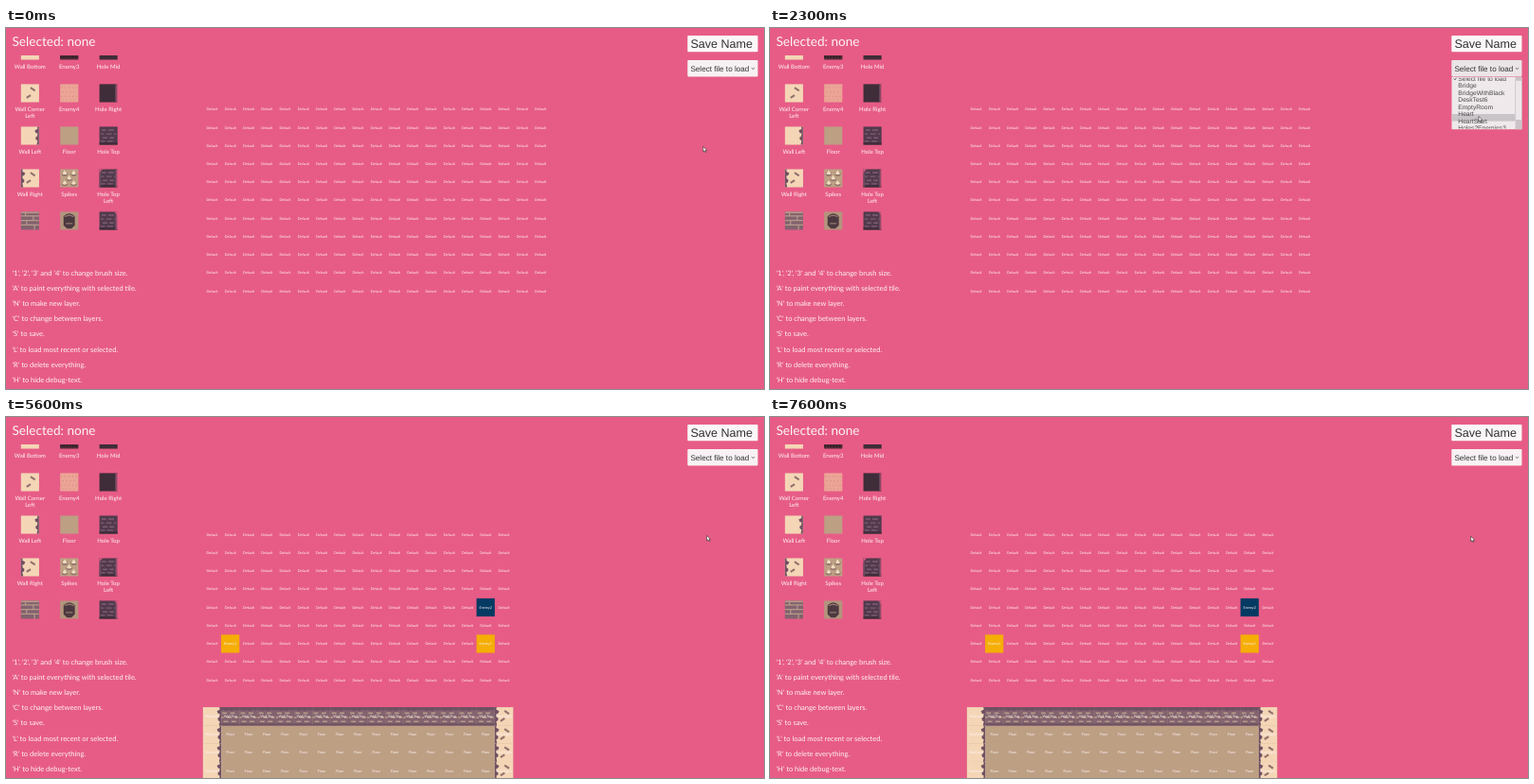
Recreate the animation shown at these times as an HTML page. Size 800 by 382 pixels, loop 8 s.

```html
<!DOCTYPE html>
<html lang="en">
<head>
<meta charset="utf-8">
<title>Tile map editor</title>
<style>
  html, body { margin: 0; width: 100%; height: 100%; overflow: hidden; background: #e75c86; }
  svg { display: block; width: 100vw; height: 100vh; }
  text { text-rendering: geometricPrecision; }
  .ui { font-family: Lato, "Open Sans", sans-serif; fill: #fff4f7; }
  .box { font-family: "Liberation Sans", Arial, sans-serif; fill: #323232; }
  .mid { text-anchor: middle; }
</style>
</head>
<body>
<svg id="stage" viewBox="0 0 800 382"></svg>
<script>
const LOOP = 8000, STEP = 100;
const CELL = 19.25, ROW = 19.22, LEFT = 207.9, LAYER_GAP = 192.2;
const C = {
  bg: '#e75c86', cream: '#f4d6b6', tan: '#bd9f84', chip: '#93716d', plum: '#6f5063',
  hole: '#3f2d39', rim: '#694a60', brick: '#82636e', mortar: '#b8998a', blue: '#053a63', gold: '#f5ae05'
};

const rect = (x, y, w, h, fill, extra = '') =>
  `<rect x="${x}" y="${y}" width="${w}" height="${h}" fill="${fill}" ${extra}/>`;
const path = (d, fill, extra = '') => `<path d="${d}" fill="${fill}" ${extra}/>`;
const line = (d, color, width, dash = 'none') =>
  path(d, 'none', `stroke="${color}" stroke-width="${width}" stroke-dasharray="${dash}"`);
const text = (x, y, size, str, cls = 'ui', extra = '') =>
  `<text x="${x}" y="${y}" font-size="${size}" class="${cls}" ${extra}>${str}</text>`;
const label = (x, y, str) => text(x, y + 1.3, 3.75, str, 'ui mid');
const range = (n, fn) => Array.from({ length: n }, (_, i) => fn(i)).join('');
const mirror = art => `<g transform="matrix(-1 0 0 1 16 0)">${art}</g>`;

// Tiles live on a 16 x 16 grid.
const base = fill => rect(0, 0, 16.1, 16.1, fill);
const edge = path('M16 0h-1.6l.4 2-2.6 1.5 1 2 1.6.5-.4 2.5-1.4 1 .2 2 1.6 1-.8 3.5h2z', C.plum);
const chips = line('M8.5 3.2l4 2.6M5 12.2l3.6-2.4', C.chip, 1.8);
const holeBricks = line('M2 3h4M8 3h5M1 6.5h3M6 6.5h5M13 6.5h2M3 10h4M9 10h4M1 13h4M7 13h5', '#7d5c74', 1.2);
const holeTop = base('#523a4c') + rect(0, 14.2, 16, 1.9, C.hole) + holeBricks;
const rim = rect(13.9, 0, 1.3, 16, C.rim) + rect(15.2, 0, .9, 16.1, C.bg);
const corner = path('M0 0h5q-5 0-5 5z', C.bg);

const tiles = {
  floor: base(C.tan),
  wallLeft: base(C.cream) + edge,
  wallRight: base(C.cream) + mirror(edge) + chips,
  chipped: base(C.cream) + chips,
  wallBottom: base(C.cream) +
    path('M0 0h16v1.6l-2 .2-1.5 1.4-2-1.4-2 .2-1.5 1.4-2-1.6-2 1.2-1.5-1.2-1.5 .4z', C.plum),
  wallTop: base(C.brick) +
    line('M1 5.2h4M8 5.2h4M0 9h2M5 9h4M12 9h3M2 12.6h4M9 12.6h4', C.mortar, 1.4) +
    path('M0 0h16v2l-2 1-2-1-3 1.6-2-1.2-3 1-2-1.2-2 .8z', C.plum) + rect(0, 14.4, 16, 1.7, C.plum),
  bricks: base(C.brick) +
    line('M0 3.8h16M0 7.8h16M0 11.8h16M4 0v4M11 4v4M5 8v4M12 12v4', C.mortar, 1) + rect(0, 0, 16, 1.4, C.mortar),
  enemy3: base('#4f2c38') + line('M0 13.8h16', '#2b1c25', 1.6, '1.4 1.2'),
  enemy4: base('#eba596') + line('M1 3h14M2 7h13M1 11h14M2 14h13', '#dd8a86', 1, '1 2.2'),
  holeMid: base(C.hole),
  holeRight: base(C.hole) + rim,
  holeTop,
  holeTopLeft: holeTop + rim + rect(0, 0, 1.4, 16, C.rim) + corner,
  holeTopRight: holeTop + rim + mirror(corner),
  spikes: base(C.tan) + [[4, 3], [12, 3], [8, 7.5], [4, 12], [12, 12]].map(([x, y]) =>
    `<ellipse cx="${x}" cy="${y + 1.4}" rx="2.6" ry="1.7" fill="#92746b"/>` +
    path(`M${x - 2.2} ${y + 1}l2.2-3 2.2 3q-2.2 1.6-4.4 0z`, '#eedcc0')).join(''),
  crest: base('#b3957d') + path('M3 4q5-5 10 0v8l-3 3h-4l-3-3z', '#4b3840') +
    line('M4 4.5q4-2.5 8 0M5 10.5h6', '#94786e', 1.2)
};
const defs = Object.entries(tiles).map(([id, art]) => `<g id="${id}">${art}</g>`).join('');
const tile = (id, x, y, size = CELL) =>
  `<use href="#${id}" transform="translate(${x} ${y}) scale(${size / 16})"/>`;

const colX = c => LEFT + CELL * (c + .5);

function palette() {
  const rows = [
    [['wallBottom', 'Wall Bottom'], ['enemy3', 'Enemy3'], ['holeMid', 'Hole Mid']],
    [['chipped', 'Wall Corner|Left'], ['enemy4', 'Enemy4'], ['holeRight', 'Hole Right']],
    [['wallLeft', 'Wall Left'], ['floor', 'Floor'], ['holeTop', 'Hole Top']],
    [['wallRight', 'Wall Right'], ['spikes', 'Spikes'], ['holeTopLeft', 'Hole Top|Left']],
    [['bricks', ''], ['crest', ''], ['holeTopRight', '']]
  ];
  const items = rows.map((row, r) => row.map(([id, name], c) => {
    const x = 25.3 + c * 41.4, y = 14.4 + r * 45;
    return tile(id, x - 9.5, y, 19) +
      name.split('|').map((s, i) => text(x, y + 28.7 + i * 7.1, 6.05, s, 'ui mid')).join('');
  }).join('')).join('');
  return `<clipPath id="view"><rect x="0" y="29" width="140" height="185"/></clipPath>
    <g clip-path="url(#view)">${items}</g>`;
}

function help() {
  return ["'1', '2', '3' and '4' to change brush size.", "'A' to paint everything with selected tile.",
    "'N' to make new layer.", "'C' to change between layers.", "'S' to save.",
    "'L' to load most recent or selected.", "'R' to delete everything.", "'H' to hide debug-text."]
    .map((s, i) => text(6.5, 262.2 + i * 16.07, 7.5, s)).join('');
}

const emptyGrid = () => range(11, r => range(19, c => label(colX(c), 86 + r * ROW, 'Default')));

function enemyLayer() {
  const special = { '4,15': ['Enemy2', C.blue], '6,1': ['Enemy1', C.gold], '6,15': ['Enemy1', C.gold] };
  return range(9, r => range(17, c => {
    const [name, fill] = special[r + ',' + c] || ['Default'];
    const x = colX(c), y = 124.5 + r * ROW;
    return (fill ? rect(x - 9.7, y - 9.5, CELL, ROW, fill) : '') + label(x, y, name);
  }));
}

function hole(x, y) {
  const w = CELL * 3, h = ROW * 3;
  return rect(x + .8, y + .8, w - 1.6, h - 1.6, C.hole, `rx="5" stroke="${C.rim}" stroke-width="1.8"`) +
    path(`M${x + 1} ${y + 15}v-9q0-5 5-5h${w - 12}q5 0 5 5v9z`, '#5f4459') +
    range(3, i => line(`M${x + 4 + i * 2} ${y + 3.5 + i * 4.2}h${w - 10}`, '#82607a', 1.4, '5 2.5'));
}

function roomLayer() {
  const top = 114.9 + LAYER_GAP, rowY = r => top + ROW * r;
  const pick = (r, c) => {
    if (r === 8) return c === 0 || c === 16 ? 'chipped' : 'wallBottom';
    if (c === 0) return 'wallLeft';
    if (c === 16) return 'wallRight';
    return r === 0 ? 'wallTop' : '';
  };
  const side = (c, a, b) => c === a ? ' Left' : c === b ? ' Right' : '';
  const name = (r, c) => {
    if (r === 8) return 'Wall Bottom' + side(c, 0, 16);
    if (c === 0 || c === 16) return 'Wall' + side(c, 0, 16);
    if (r === 0) return 'Wall Top';
    const h = c > 10 ? c - 11 : c - 3;
    if (r < 4 || r > 6 || h < 0 || h > 2) return 'Floor';
    const lr = side(h, 0, 2);
    return 'Hole' + (r === 5 ? lr || ' Mid' : (r === 4 ? ' Top' : ' Bottom') + lr);
  };
  let art = rect(LEFT, top, CELL * 17, ROW * 9, C.tan), names = '';
  for (let r = 0; r < 9; r++) for (let c = 0; c < 17; c++) {
    const id = pick(r, c);
    if (id) art += tile(id, LEFT + c * CELL, rowY(r));
    names += label(colX(c), rowY(r + .5), name(r, c));
  }
  return art + hole(LEFT + 3 * CELL, rowY(4)) + hole(LEFT + 11 * CELL, rowY(4)) + names;
}

const ITEM = 7.55, LIST_TOP = 53.3;
const files = ['Select file to load', 'Bridge', 'BridgeWithBlack', 'DeskTest6', 'EmptyRoom',
  'Heart', 'HeartStart', 'Holes2Enemies3'];

function dropdown() {
  return `<clipPath id="listView"><rect x="719.5" y="52.5" width="67" height="54"/></clipPath>
    <g id="list">${rect(719.5, 52, 74, 55.2, '#efe9ec')}
      <g clip-path="url(#listView)">
        ${rect(719.5, 0, 67, ITEM, '#c9c4c7', 'id="hover"')}
        <g id="items">
          ${line('M721.5 57.2l1.4 1.6 2.2-3.6', '#555', .8)}
          ${files.map((s, i) => text(726.3, LIST_TOP + i * ITEM + 6.1, 6.7, s, 'box', 'style="fill:#484848"')).join('')}
        </g>
      </g>
      ${rect(786.6, 52, 6.9, 55.2, '#cbc3c7')}
      ${rect(786.9, 52.3, 6.3, 42, '#ece8ea', 'id="thumb" stroke="#b9afb4" stroke-width=".4"')}
    </g>`;
}

const stage = document.getElementById('stage');
stage.innerHTML = `<defs>${defs}</defs>${rect(0, 0, 800, 382, C.bg)}
  <g id="empty">${emptyGrid()}</g>
  <g id="map">${enemyLayer()}${roomLayer()}</g>
  ${text(6.5, 19.3, 13.6, 'Selected: none')}${palette()}${help()}
  ${rect(719.3, 8, 74.2, 17.2, '#fbf7f8', 'rx=".8"')}${text(722.4, 21, 12.55, 'Save Name', 'box')}
  ${rect(719.3, 34, 74.2, 17.4, '#f7f1f3', 'rx=".8" id="button"')}
  ${text(722.4, 45.8, 8.15, '', 'box', 'id="caption"')}
  ${line('M786.9 42.1l1.6 1.5 1.6-1.5', '#444', .8)}
  ${dropdown()}
  <path id="cursor" d="M0 0v5.6l1.3-1.2 1 2 .9-.4-.9-1.9h1.7z" fill="#fff" stroke="#2b2b2b" stroke-width=".6"/>`;
const el = id => document.getElementById(id);

// Piecewise linear track of [time, ...values].
function track(keys, t) {
  const i = keys.findIndex(k => k[0] > t);
  if (i < 0) return keys[keys.length - 1].slice(1);
  if (i === 0) return keys[0].slice(1);
  const a = keys[i - 1], b = keys[i], p = (t - a[0]) / (b[0] - a[0]);
  return a.slice(1).map((v, j) => v + (b[j + 1] - v) * p);
}

const cursorKeys = [
  [0, 735.8, 125.4], [100, 735.6, 125], [200, 735.6, 125], [400, 738, 114], [800, 757, 56],
  [1000, 762, 41.2], [1700, 762, 41.2], [1900, 756, 60], [2200, 748, 93], [2400, 748, 94],
  [2500, 748, 94], [2900, 745.6, 103.6], [3300, 745.6, 103.6], [3600, 740.2, 122.2],
  [5300, 740.2, 122.2], [5500, 739.6, 125.4], [6300, 739.6, 125.4], [6400, 739.7, 126.2]
];
const listKeys = [[1400, 0], [1600, .9], [1700, 1], [3200, 1], [3300, .92], [3400, 0]];
const scrollKeys = [[2200, 0], [2400, 1]];
const within = (t, a, b) => t >= a && t < b;

function draw(ms) {
  const t = Math.floor((ms % LOOP) / STEP) * STEP;
  const [x, y] = track(cursorKeys, t);
  const [fade] = track(listKeys, t);
  const [scroll] = track(scrollKeys, t);
  const loaded = t >= 4000;
  const lower = within(t, 5400, 5600) || within(t, 6600, 6800);

  el('cursor').setAttribute('transform', `translate(${x} ${y})`);
  el('empty').style.display = loaded ? 'none' : '';
  el('map').style.display = loaded ? '' : 'none';
  el('map').setAttribute('transform', `translate(0 ${lower ? -LAYER_GAP : 0})`);

  el('caption').textContent = within(t, 3300, 4000) ? files[7] : files[0];
  el('button').setAttribute('fill', within(t, 1400, 3400) ? '#ebe5e8' : '#f7f1f3');
  el('list').style.display = fade ? '' : 'none';
  el('list').style.opacity = fade;
  el('items').setAttribute('transform', `translate(0 ${-scroll * ITEM})`);
  el('thumb').setAttribute('y', 52.3 + scroll * 6);
  const row = Math.floor((y - LIST_TOP) / ITEM);
  el('hover').style.display = row >= 0 && row < 7 ? '' : 'none';
  el('hover').setAttribute('y', LIST_TOP + row * ITEM);
}

const start = performance.now();
function frame() {
  draw(performance.now() - start);
  requestAnimationFrame(frame);
}
draw(0);
requestAnimationFrame(frame);
</script>
</body>
</html>
```
